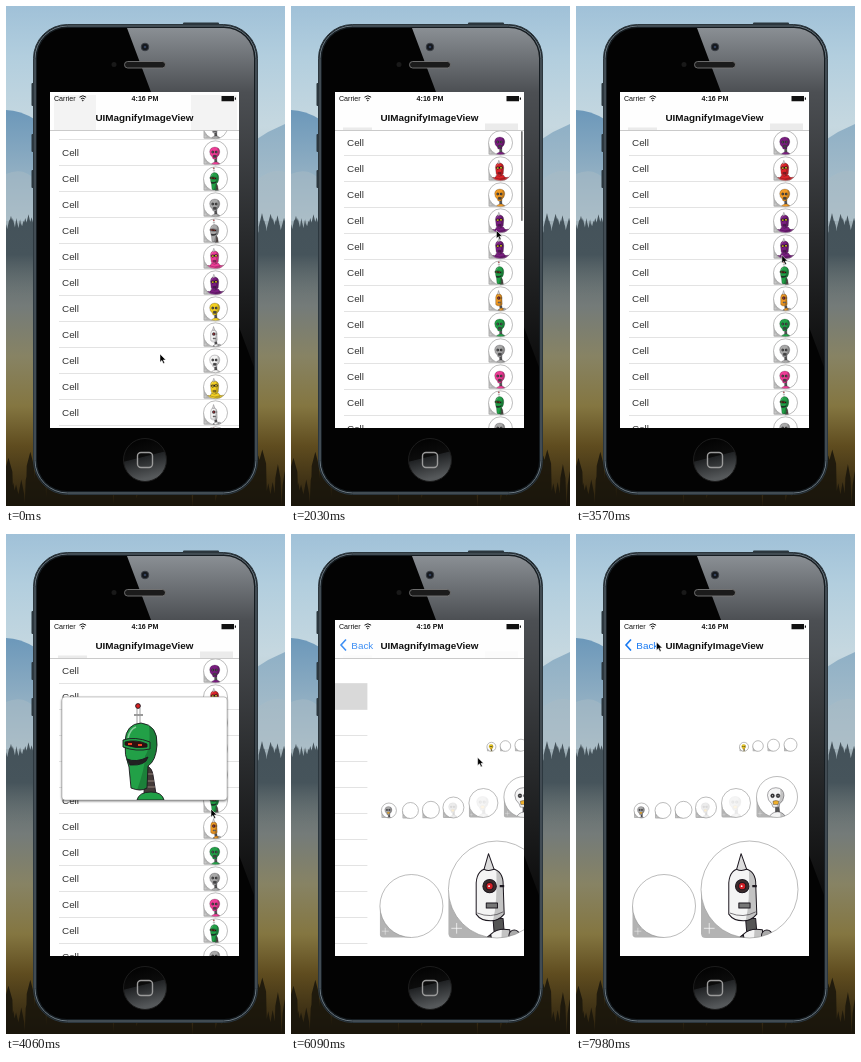
These frames come from a looping animation (279 px wide and 500 px high, 8 s). An HTML page:

```html
<!DOCTYPE html>
<html lang="en">
<head>
<meta charset="utf-8">
<title>UIMagnifyImageView</title>
<style>
  html, body { margin: 0; width: 100%; height: 100%; overflow: hidden; background: #000; }
  svg { display: block; width: 100vw; height: 100vh; }
  text { font-family: "Liberation Sans", Arial, sans-serif; font-size: 9.9px; fill: #111; }
  .small { font-size: 7.1px; }
  .bold { font-weight: bold; }
  .cell { fill: #333; }
  .back { fill: #1678f2; }
  .ink { stroke: #1d1820; stroke-width: .9; stroke-linejoin: round; }
  .shade { fill: #000; opacity: .2; stroke: none; }
  .shine { fill: none; stroke: #fff; stroke-width: 1.6; opacity: .45; }
  .popup { filter: drop-shadow(0 1.2px 1.2px rgba(0, 0, 0, .55)); }
</style>
</head>
<body>
<svg viewBox="0 0 279 500" preserveAspectRatio="none">
  <defs>
    <linearGradient id="sky" x2="0" y2="1">
      <stop offset="0" stop-color="#a0c1d8"/><stop offset=".1" stop-color="#b2cede"/>
      <stop offset=".24" stop-color="#c6d8e0"/><stop offset=".4" stop-color="#b4c3c9"/>
      <stop offset=".5" stop-color="#5a676b"/><stop offset=".6" stop-color="#747b79"/>
      <stop offset=".7" stop-color="#878364"/><stop offset=".8" stop-color="#847641"/>
      <stop offset=".88" stop-color="#5f4c1f"/><stop offset="1" stop-color="#2a200f"/>
    </linearGradient>
    <linearGradient id="hill" x2="0" y2="1">
      <stop offset="0" stop-color="#6c98ba"/><stop offset="1" stop-color="#adc0c9"/>
    </linearGradient>
    <linearGradient id="farHill" x2="0" y2="1">
      <stop offset="0" stop-color="#8fb0c6"/><stop offset="1" stop-color="#b1c2ca"/>
    </linearGradient>
    <linearGradient id="wood" x2="0" y2="1">
      <stop offset="0" stop-color="#44525a"/><stop offset=".5" stop-color="#46545b"/>
      <stop offset="1" stop-color="#6b7474" stop-opacity="0"/>
    </linearGradient>
    <linearGradient id="gloss" gradientUnits="userSpaceOnUse" x1="0" y1="22" x2="0" y2="361">
      <stop offset="0" stop-color="#8a8f94"/><stop offset=".19" stop-color="#4c4f53"/>
      <stop offset=".6" stop-color="#2a2c2e"/><stop offset="1" stop-color="#0c0c0c"/>
    </linearGradient>
    <linearGradient id="button" x2=".25" y2="1">
      <stop offset="0" stop-color="#000"/><stop offset=".5" stop-color="#0c0c0c"/>
      <stop offset=".52" stop-color="#202224"/><stop offset="1" stop-color="#55585a"/>
    </linearGradient>
    <clipPath id="disc"><circle r="1"/></clipPath>
    <clipPath id="card"><rect width="165" height="103" rx="3"/></clipPath>
    <clipPath id="screen"><rect x="44" y="86" width="189" height="336"/></clipPath>
    <clipPath id="face"><rect x="31" y="22" width="217" height="463" rx="30"/></clipPath>

    <g id="stocky" class="ink">
      <g fill="var(--c)">
        <path d="M98 103V88Q106 80 120 82Q134 84 135 92V103Z"/>
        <path d="M37 103Q38 84 54 83Q64 84 66 103Z"/>
        <path d="M55 103V89Q58 81 70 81H96Q107 82 110 92V103Z"/>
        <path d="M65 76L63 86Q80 93 100 84L94 74Z"/>
        <path d="M63 45Q64 28 77 27Q94 28 95 46L93 69Q89 78 79 79Q69 78 66 70Z"/>
      </g>
      <path class="shade" d="M85 29Q95 34 95 46L93 69Q89 78 79 79Q88 62 85 29ZM63 86Q80 93 100 84L106 103H90Q92 92 63 86ZM55 90V103H46Q55 100 55 90ZM110 92Q124 88 135 92V103H110Z"/>
      <path class="shine" d="M67 40Q69 33 75 31M42 92Q46 87 52 87"/>
      <path d="M72 30L76 17L81 29Q76 32 72 30Z" fill="#ddd"/>
      <path d="M66 44Q72 40 77 43Q83 39 91 43Q91 51 84 51Q80 51 78 48Q76 53 70 52Q66 50 66 44Z" fill="#24122a"/>
      <g fill="#ffe21c"><ellipse cx="72" cy="47" rx="4" ry="3.300"/><ellipse cx="84.500" cy="46" rx="4.300" ry="3.400"/></g>
      <path d="M72 47h1M84.500 46h1" stroke-width="1.600"/>
      <path d="M73 63v8M76.300 62v10M79.600 62v10M83 62v9" stroke-width="2"/>
    </g>

    <g id="dome" class="ink">
      <path d="M83 68Q90 70 91 78L94 97H82Z" fill="#443a38"/>
      <path d="M83 77h8M83 84h9M83 90h10" stroke="#9a8a80"/>
      <path d="M75 11V30M78 11V30" stroke="#777" stroke-width=".7"/>
      <path d="M72 18H81" stroke="#999" stroke-width="2"/>
      <circle cx="76" cy="9" r="2.400" fill="#d81f1f"/>
      <g fill="var(--c)">
        <path d="M75 103Q77 95 89 95Q100 95 102 103Z"/>
        <path d="M63 44Q64 27 79 26Q96 28 95 48Q94 64 86 69L85 91Q79 95 69 91L67 70Q62 58 63 44Z"/>
      </g>
      <path class="shade" d="M87 29Q96 34 95 48Q94 64 86 69L85 91Q80 94 75 93Q83 71 83 59Q89 50 87 29Z"/>
      <path class="shine" d="M66 41Q68 32 74 30"/>
      <path d="M61 43Q73 39 88 45V52Q74 55 61 50Z" fill="var(--c)"/>
      <path d="M63 45Q74 42 85 47V50Q74 52 63 48Z" fill="#301010"/>
      <path d="M66 47h4M76 48h4" stroke="#f04522" stroke-width="2.200"/>
      <path d="M65 62Q74 66 86 60Q84 69 68 68Z" fill="#222"/>
    </g>

    <g id="slim" class="ink">
      <path d="M79 76h9l1 12h-9ZM98 94l5 10h-6ZM72 94l5-4 3 13h-9Z" fill="#555"/>
      <path d="M79 103L77 90Q83 84 94 86L95 103Z" fill="var(--c)"/>
      <path class="shade" d="M87 85L94 86L95 103H86Z"/>
      <path d="M79 95h16" stroke-width=".6"/>
      <circle cx="98" cy="91" r="4.800" fill="#aaa"/>
      <path d="M64 44Q65 31 76 31Q87 32 88 43L89 72Q84 78 77 78Q68 78 64 72Z" fill="var(--c)"/>
      <path class="shade" d="M82 33Q88 36 88 43L89 72Q85 78 79 78Q83 61 82 33Z"/>
      <path d="M71 32L75 18L80 32Q75 34 71 32Z" fill="#ddd"/>
      <circle cx="76" cy="47" r="6" fill="#3b2b2b"/>
      <circle cx="76" cy="47" r="3.200" fill="#d21f26"/>
      <circle cx="75.500" cy="47" r=".8" fill="#fff" stroke="none"/>
      <path d="M85 47h4" stroke-width="2"/>
      <rect x="73" y="62" width="10" height="4.500" fill="#777"/>
      <path d="M65 71Q77 76 88 70" fill="none" stroke-width=".5"/>
    </g>

    <g id="bulb" class="ink">
      <path d="M79 70H87L89 88H79Z" fill="#555"/>
      <path d="M62 103Q66 86 84 85Q101 86 104 103Z" fill="var(--c)"/>
      <path class="shade" d="M90 86Q101 88 104 103H91Z"/>
      <path d="M60 46Q61 29 80 28Q99 29 99 47Q98 60 89 66L87 74H73L70 66Q60 58 60 46Z" fill="var(--c)"/>
      <path class="shade" d="M90 31Q99 35 99 47Q98 60 89 66L87 74H81Q93 55 90 31Z"/>
      <g fill="#333"><circle cx="72" cy="47" r="4.500"/><circle cx="85" cy="47" r="4.500"/></g>
      <path d="M71 47h2M84 47h2" stroke="#fff" stroke-width="2"/>
      <path d="M73 60Q80 57 87 60L85 68H74Z" fill="var(--mouth, #444)"/>
    </g>
  </defs>

  <g id="scene"></g>

  <!-- phone body -->
  <g fill="#2b363d">
    <rect x="25.500" y="77" width="3" height="23" rx="1"/>
    <rect x="25.500" y="128" width="3" height="18" rx="1"/>
    <rect x="25.500" y="164" width="3" height="18" rx="1"/>
    <rect x="177" y="16.500" width="36" height="4" rx="1"/>
  </g>
  <rect x="27.500" y="18.500" width="224" height="470" rx="34" fill="#161d22" stroke="#2c373e"/>
  <rect x="29" y="20" width="221" height="467" rx="32.500" fill="none" stroke="#6d7a83" stroke-width="1"/>
  <g clip-path="url(#face)">
    <rect x="31" y="22" width="217" height="463" fill="#030303"/>
    <path d="M121 22H248V361Z" fill="url(#gloss)"/>
  </g>
  <circle cx="108" cy="58.500" r="2.500" fill="#191919"/>
  <circle cx="139" cy="41" r="3.800" fill="#15181d" stroke="#3a3e45"/>
  <circle cx="139" cy="41" r="1.300" fill="#33415c"/>
  <rect x="118.500" y="55.500" width="41" height="6.500" rx="3.200" fill="#1b1b1b" stroke="#777" stroke-width=".9"/>
  <circle cx="139" cy="454" r="21.500" fill="url(#button)" stroke="#1c1c1c"/>
  <rect x="131.500" y="446.500" width="15" height="15" rx="3.500" fill="none" stroke="#9a9a9a" stroke-width="1.400"/>

  <g clip-path="url(#screen)">
    <rect x="44" y="86" width="189" height="336" fill="#fff"/>
    <g id="listPage">
      <rect x="44" y="86" width="189" height="336" fill="#fff"/>
      <rect id="touch" x="44" y="149.500" width="189" height="26" fill="#d9d9d9"/>
      <g id="rows"></g>
      <rect id="thumb" x="230" width="1.700" height="90" rx=".8" fill="#777"/>
    </g>
    <g id="detailPage"></g>
    <rect x="44" y="86" width="189" height="38.500" fill="#fefefe"/>
    <path id="scrolledTint" d="M48 89H90V124H48ZM185 89H231V124H185Z" fill="#f3f3f3"/>
    <path id="restTint" d="M52 121.500H81V124H52ZM194 117.500H227V124H194Z" fill="#ebebeb"/>
    <path d="M44 124.500H233" stroke="#bdbdbd" stroke-width=".8"/>
    <text class="small" x="48" y="95">Carrier</text>
    <g fill="none" stroke="#111" stroke-width="1">
      <path d="M73.500 91.200Q76.800 88.300 80.100 91.200M74.900 92.900Q76.800 91.300 78.700 92.900"/>
      <circle cx="76.800" cy="94.500" r=".4"/>
    </g>
    <text class="small bold" x="139" y="95" text-anchor="middle">4:16 PM</text>
    <path d="M215.500 90H228V95.300H215.500ZM228.800 91.600H230V93.700H228.800Z" fill="#111"/>
    <text class="bold" x="138.500" y="114.500" text-anchor="middle">UIMagnifyImageView</text>
    <g id="back">
      <path d="M55 105.500L50 111L55 116.500" fill="none" stroke="#1678f2" stroke-width="1.600"/>
      <text class="back" x="60.300" y="114.500">Back</text>
    </g>
    <g id="popups"></g>
  </g>
  <path id="cursor" d="M0 0V8.200L1.900 6.400L3.300 9.500L4.700 8.900L3.300 5.900H5.800Z" fill="#000" stroke="#fff" stroke-width=".5"/>
</svg>

<script>
const $ = id => document.getElementById(id);
const clamp = v => Math.max(0, Math.min(1, v));
const mix = (a, b, p) => a + (b - a) * p;
const smooth = p => p * p * (3 - 2 * p);
const LOOP = 8000, STEP = 70, ROW = 26;

const colors = {
  purple: '#7a1d80', red: '#dc2328', orange: '#f09a24', peach: '#f2b989', green: '#22a047',
  grey: '#a9a9a9', pink: '#ee3c96', yellow: '#f2cf22', white: '#f4f4f4'
};
const bot = (kind, color, attrs = '') =>
  `<use href="#${kind}" style="--c:${colors[color]}" ${attrs}/>`;

// Round thumbnail with a grey corner holding a plus sign.
function thumbnail(x, y, r, kind, color, { zoom = 1, fade = 1 } = {}) {
  const image = kind ? `<g clip-path="url(#disc)" opacity="${fade}">${
    bot(kind, color, `transform="scale(${zoom / 48.5}) translate(-82.5 -50)"`)}</g>` : '';
  return `<g transform="translate(${x} ${y}) scale(${r})">
    <path d="M-1 0V.9Q-1 1 -.9 1H0Z" fill="#b3b3b3"/>
    <path d="M-.94 .8H-.72M-.83 .69V.91" stroke="#fff" stroke-width=".014"/>
    <circle r="1" fill="#fff"/>${image}
    <circle r="1" fill="none" stroke="#8f8f8f" stroke-width="${.6 / r}"/></g>`;
}

// Scenery
let seed = 11;
const random = () => (seed = seed * 16807 % 2147483647) / 2147483647;
function trees(x0, x1, top, bottom, count, jitter) {
  let d = '';
  for (let i = 0; i < count; i++) {
    const x = mix(x0, x1, (i + random()) / count), y = top + random() * jitter, w = 2 + random() * 2;
    d += `M${x} ${y}L${x + w} ${y + 14}L${x + w + 1} ${bottom}H${x - w - 1}L${x - w} ${y + 14}Z`;
  }
  return d;
}
$('scene').innerHTML = `<rect width="279" height="500" fill="url(#sky)"/>
  <path d="M0 104Q14 104 30 114L60 150V215H0Z" fill="url(#hill)"/>
  <path d="M240 140L262 126L279 118V215H240Z" fill="url(#farHill)"/>
  <path d="M0 168Q18 160 30 175H250Q264 162 279 166V230H0Z" fill="#aabcc5" opacity=".5"/>
  <path d="${trees(-2, 32, 207, 290, 16, 13)}${trees(248, 281, 207, 290, 16, 13)}" fill="url(#wood)"/>
  <path d="${trees(0, 279, 442, 500, 60, 38)}" fill="#18140b" opacity=".85"/>`;

// List
const S = 'stocky', D = 'dome', W = 'slim', B = 'bulb';
const robots = [
  [B, 'purple'], [S, 'red'], [B, 'orange'], [S, 'purple'], [S, 'purple'], [D, 'green'], [W, 'orange'],
  [B, 'green'], [B, 'grey'], [B, 'pink'], [D, 'green'], [B, 'grey'], [D, 'grey'], [S, 'pink'],
  [S, 'purple'], [B, 'yellow'], [W, 'white'], [B, 'white'], [S, 'yellow'], [W, 'white'], [D, 'grey']
];
const cellImage = ([kind, color], i) =>
  thumbnail(209.5, 136.8 + i * ROW, 12, kind, color, { zoom: 1.05 });
$('rows').innerHTML = robots.map((robot, i) => {
  const y = 136 + i * ROW;
  return `<text class="cell" x="56" y="${y + 3.7}">Cell</text>
    <path d="M53 ${y + 13.5}H233" stroke="#dcdcdc" stroke-width=".8"/><g>${cellImage(robot, i)}</g>`;
}).join('') + `<g id="earlyImages">${[[S, 'orange'], [B, 'peach']]
  .map((robot, i) => cellImage(robot, i + 1)).join('')}</g>`;

// Detail page
$('detailPage').innerHTML = '<rect x="44" y="86" width="189" height="336" fill="#fff"/>' + [
  [168, 212.8, 4.5, B, 'yellow', { zoom: 1.2 }], [182, 212, 5.3], [197.5, 211.2, 6], [214.5, 210.8, 6.5],
  [65.5, 276.5, 7.5, B, 'grey', { zoom: 1.2 }], [87, 276.5, 8], [107.5, 275.8, 8.5],
  [130, 273.5, 10.5, B, 'grey', { fade: .22 }], [160, 269, 14.5, B, 'grey', { fade: .12 }],
  [201, 263, 20.5, B, 'white'],
  [88, 372, 31.5], [173.5, 355.5, 48.5, W, 'white', { zoom: 1.12 }]
].map(args => thumbnail(...args)).join('');
$('detailPage').style.setProperty('--mouth', '#f0b02c');

// Magnified cards grow out of the touched thumbnail
const cards = [
  { robot: robots[3], y: 221, from: [209.5, 215], open: 2660, close: 3220 },
  { robot: robots[5], y: 163, from: [209.5, 267], open: 3640, close: 4130 },
  { robot: [W, 'white'], y: 203, from: [173.5, 355], open: 6580, close: 7490 }
];
$('popups').innerHTML = cards.map(({ robot }) => `<g class="popup">
  <rect width="165" height="103" rx="3" fill="#fff" stroke="#999" stroke-width=".5"/>
  <g clip-path="url(#card)">${bot(...robot)}</g></g>`).join('');

const path = [
  [280, 154, 348], [1330, 202, 249], [2450, 207, 213], [3220, 207, 213], [3850, 205, 275],
  [4830, 205, 275], [5390, 200, 158], [5600, 200, 160], [5810, 200, 160],
  [6440, 168, 312], [7560, 168, 312], [7980, 80.5, 108]
];
function cursorAt(t) {
  const i = path.findIndex(p => p[0] > t);
  if (i === 0) return path[0].slice(1);
  if (i < 0) return path[path.length - 1].slice(1);
  const [a, b] = [path[i - 1], path[i]], p = smooth((t - a[0]) / (b[0] - a[0]));
  return [mix(a[1], b[1], p), mix(a[2], b[2], p)];
}
const move = (id, x, y) => $(id).setAttribute('transform', `translate(${x} ${y})`);
const fade = (id, opacity) => $(id).setAttribute('opacity', opacity);

function draw(t) {
  const scroll = 224 * (1 - clamp((t - 280) / 1672)) ** 2;
  const early = t < 1960;
  move('rows', 0, -scroll);
  $('thumb').setAttribute('y', 125 + scroll * .303);
  fade('thumb', t < 280 ? 0 : 1 - clamp((t - 2030) / 350));
  fade('earlyImages', +early);
  fade('scrolledTint', +early);
  fade('touch', +(t >= 5670));

  const push = 1 - (1 - clamp((t - 5810) / 630)) ** 3;
  move('listPage', -57 * push, 0);
  move('detailPage', 189 * (1 - push), 0);
  fade('back', push);
  fade('restTint', early ? 0 : 1 - push);

  cards.forEach(({ y, from, open, close }, i) => {
    const p = smooth(clamp((t - open) / 280)) * (1 - smooth(clamp((t - close) / 280)));
    const cx = mix(from[0], 138.5, p), cy = mix(from[1], y + 51.5, p);
    const card = $('popups').children[i];
    card.setAttribute('transform', `translate(${cx} ${cy}) scale(${mix(.14, 1, p)}) translate(-82.5 -51.5)`);
    card.setAttribute('opacity', Math.min(1, p * 3));
  });
  move('cursor', ...cursorAt(t));
}

function tick() {
  const t = performance.now() % LOOP;
  draw(Math.floor(t / STEP) * STEP);
  requestAnimationFrame(tick);
}
tick();
</script>
</body>
</html>
```
